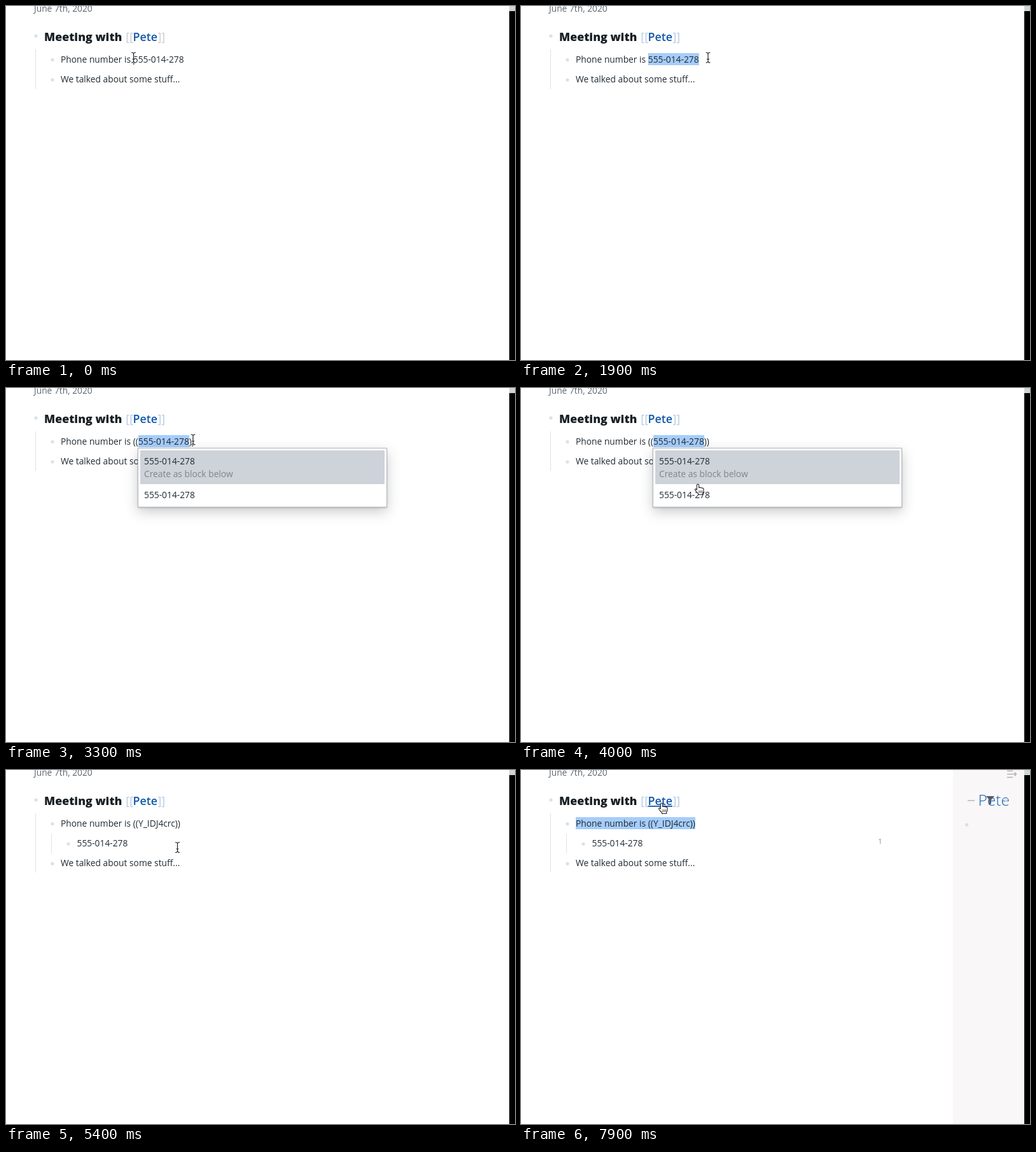
Animation, 800 px wide and 556 px high, one loop 8 s. Source, as an HTML page:

```html
<!DOCTYPE html>
<html lang="en">
<head>
<meta charset="utf-8">
<title>Block reference</title>
<style>
  html, body { margin: 0; width: 100%; height: 100%; overflow: hidden; background: #fff; }
  svg { display: block; width: 800px; height: 556px; }
  text { font: 13.8px "Open Sans", sans-serif; fill: #202b33; white-space: pre; }
  .title { font-size: 17.8px; font-weight: 800; fill: #182026; }
  .link { font-size: 17.8px; font-weight: 600; fill: #1057a8; }
  .bracket { font-size: 17.8px; }
  .muted { fill: #7f858c; }
  .dot { fill: #dce1e5; }
  .rail { fill: #dfe1ea; }
  .sel { fill: #a6cdfb; }
  .box { fill: #fff; stroke: #b4b8bd;
    filter: drop-shadow(0 1px 1px rgba(16,22,26,.2)) drop-shadow(0 7px 10px rgba(16,22,26,.22)); }
  #beam { fill: none; stroke: #222; stroke-width: 1.2; }
  #beam .halo { stroke: #fff; stroke-width: 2.6; }
  #hand { fill: #fff; stroke: #222; stroke-width: 1.1; stroke-linejoin: round; }
</style>
</head>
<body>
<svg viewBox="0 0 800 556">
  <rect width="800" height="556" fill="#fff"/>
  <text x="44" y="9" style="fill:#5c6670">June 7th, 2020</text>

  <circle class="dot" cx="47" cy="47" r="2.6"/>
  <text class="title" x="60" y="55">Meeting with</text>
  <g id="brackets">
    <text class="bracket" x="188.3" y="55" style="fill:inherit">[[</text>
    <text class="bracket" x="238.5" y="55" style="fill:inherit">]]</text>
  </g>
  <text class="link" id="link" x="199.5" y="55">Pete</text>

  <rect class="rail" id="rail" x="46" y="68" width="1" height="62"/>
  <rect class="sel" id="sel" y="74" height="19"/>
  <circle class="dot" cx="73" cy="84.5" r="2.6"/>
  <text id="line" x="86" y="88.5"></text>
  <rect id="caret" y="75" width="1.2" height="17" fill="#111"/>

  <g id="child">
    <rect class="rail" x="71" y="100" width="1" height="31"/>
    <circle class="dot" cx="98" cy="116" r="2.6"/>
    <text class="num" x="111.5" y="119.7"></text>
  </g>
  <g id="last">
    <circle class="dot" cx="73" cy="116" r="2.6"/>
    <text x="86" y="119.7">We talked about some stuff...</text>
  </g>

  <g id="popup">
    <rect class="box" x="207.5" y="94.5" width="391" height="92.5"/>
    <rect x="211" y="98" width="384" height="53" fill="#ced2d9"/>
    <text class="num" x="217" y="119.7"></text>
    <text class="muted" x="217" y="140">Create as block below</text>
    <text class="num" x="217" y="172.5"></text>
  </g>

  <text class="muted" id="count" x="561.5" y="116" style="font-size:10.5px">1</text>
  <g id="side">
    <rect x="679" width="112" height="556" fill="#f9f7f8"/>
    <path d="M764 1.5h9M764 6.5h9M764 11.5h9M773 6.5h5M775.5 3.5l3 3-3 3" fill="none" stroke="#aeb4b9" stroke-width="1.5"/>
    <path d="M702 48h11" stroke="#b4b9be" stroke-width="1.5"/>
    <text x="718.5" y="56" style="font-size:24.5px;font-weight:300;fill:#1a62b5">Pete</text>
    <path d="M731 41h13l-5 6v6l-3 2v-8z" fill="#555c63"/>
    <path d="M759 44l7 7m0-7l-7 7" stroke="#d5dae2" stroke-width="1.5"/>
    <circle cx="700.5" cy="86" r="2.6" fill="#dcdcec"/>
  </g>

  <rect x="791" width="9" height="9" fill="#cfd6da"/>
  <rect x="791" y="8" width="9" height="548"/>

  <g id="beam">
    <path class="halo" d="M-3.5-8Q0-8 0-5.5Q0-8 3.5-8M0-6V6M-3.5 8Q0 8 0 5.5Q0 8 3.5 8"/>
    <path d="M-3.5-8Q0-8 0-5.5Q0-8 3.5-8M0-6V6M-3.5 8Q0 8 0 5.5Q0 8 3.5 8M-2 2.5H2"/>
  </g>
  <g id="hand">
    <path d="M-1.6 1.2Q0-1.2 1.6 1.2V5.5Q2.9 4.6 4.2 5.7Q5.5 5 6.7 6.2Q8.4 5.8 9 7.4V11Q8.8 13 7.6 14.6V16.5H.5V14.8Q-2.5 12.5-4.4 9.2Q-4.8 7.2-3 7.6L-1.6 9Z"/>
    <path d="M2 10v4M4.2 10v4M6.4 10v4" stroke-width=".8"/>
  </g>
</svg>
<script>
const LOOP = 8000, NUM = '555-014-278';
const DIGIT = 7.9, DASH = 4.45, PAREN = 4.1, NUM_X = 199.8;
const $ = id => document.getElementById(id);
const show = (id, on) => $(id).style.display = on ? '' : 'none';
const set = (id, attrs) => {
  for (const k in attrs) $(id).setAttribute(k, attrs[k]);
};
const ease = p => p * p * (3 - 2 * p);

// Pointer stops: time, x, y
const STOPS = [
  [0, 200.5, 81], [700, 200.5, 81], [1300, 316, 87], [1600, 294, 81],
  [3500, 294, 81], [4000, 278, 151], [4450, 269.5, 121.5],
  [5500, 269.5, 121.5], [6200, 221, 52], [LOOP, 221, 52]
];

document.querySelectorAll('.num').forEach(el => el.textContent = NUM);

function pointerAt(t) {
  const i = STOPS.findIndex(s => s[0] > t);
  const [t0, x0, y0] = STOPS[i - 1], [t1, x1, y1] = STOPS[i];
  const p = ease((t - t0) / (t1 - t0));
  return [x0 + (x1 - x0) * p, y0 + (y1 - y0) * p];
}

// Width of the digits the drag has passed, whole characters only
function draggedWidth(x) {
  let w = 0;
  for (const c of NUM) {
    const step = c === '-' ? DASH : DIGIT;
    if (NUM_X + w + step / 2 > x) break;
    w += step;
  }
  return w;
}

function draw(t) {
  const [x, y] = pointerAt(t);
  const popup = t >= 3300 && t < 4900;
  const linked = t >= 4900;
  const opened = t >= 7600;
  const parens = t < 3000 ? 0 : t < 3200 ? 1 : 2;

  const body = linked ? 'Y_IDJ4crc' : NUM;
  $('line').textContent = 'Phone number is ' + '('.repeat(parens) + body + ')'.repeat(parens);

  const selWidth = draggedWidth(t < 1300 ? x : 400);
  if (opened) set('sel', { x: 86, width: 188 });
  else set('sel', { x: NUM_X + parens * PAREN, width: linked ? 0 : selWidth });

  const blink = linked && !opened && Math.floor((t - 5200) / 500) % 2 === 1;
  show('caret', blink || t < 700);
  set('caret', { x: linked ? 273.8 : 200.2 });

  show('popup', popup);
  show('child', linked);
  set('last', { transform: `translate(0 ${linked ? 31.2 : 0})` });
  set('rail', { height: linked ? 93 : 62 });
  set('brackets', { fill: t < 1000 ? '#c8cbcd' : '#b3cae6' });

  const overLink = y < 62 && x < 240;
  $('link').style.textDecoration = overLink ? 'underline' : 'none';
  const hand = overLink || popup && y > 94;
  show('hand', hand);
  show('beam', !hand);
  set(hand ? 'hand' : 'beam', { transform: `translate(${x} ${y})` });

  const slide = ease(Math.min(1, Math.max(0, (t - 7600) / 250)));
  show('side', opened);
  show('count', opened);
  set('side', { transform: `translate(${112 * (1 - slide)} 0)` });
}

function tick() {
  draw(performance.now() % LOOP);
  requestAnimationFrame(tick);
}
tick();
</script>
</body>
</html>
```
